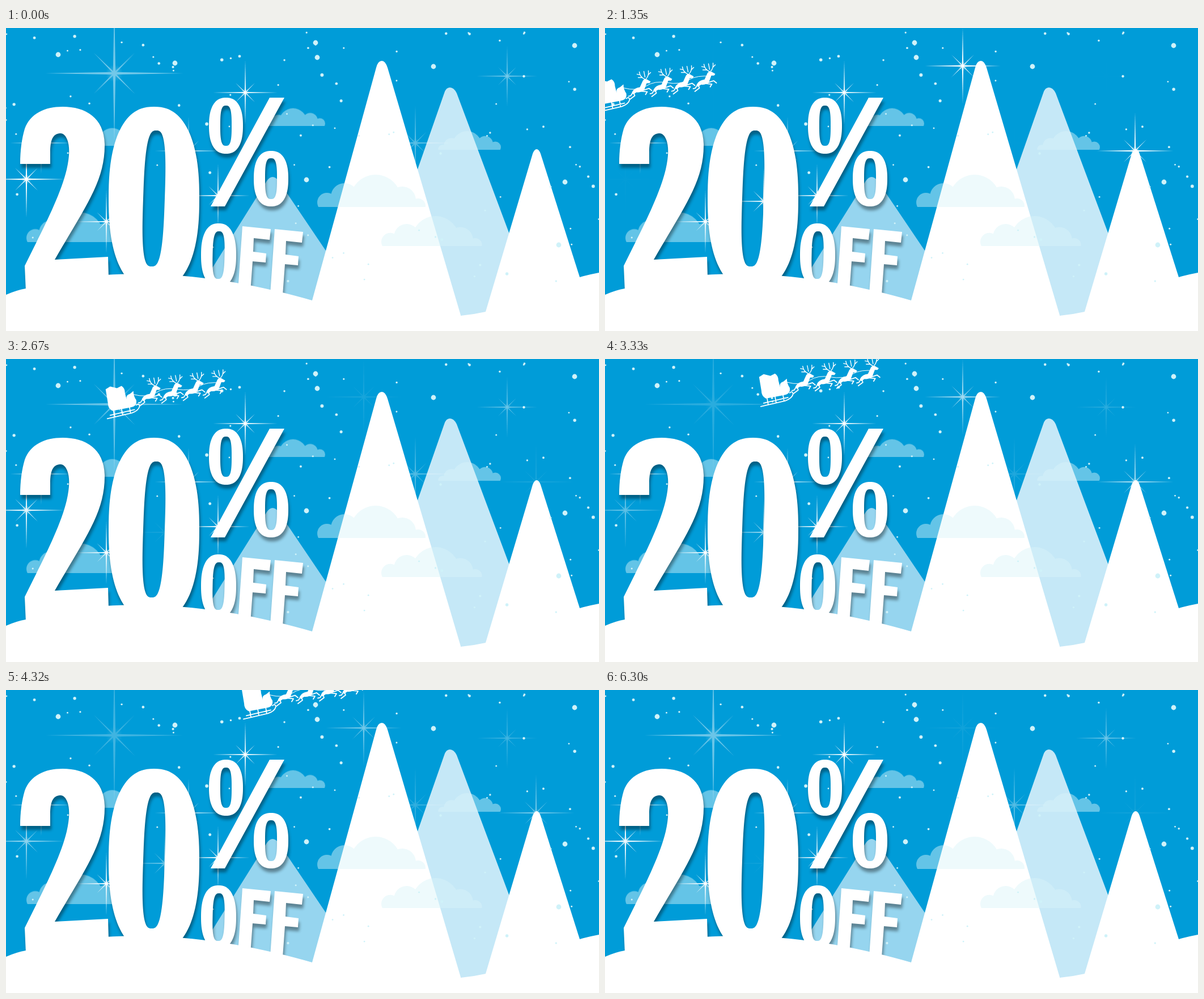
Write an HTML page that moves like this. It is 1046 by 535 pixels and loops after 6330 ms.

```html
<!DOCTYPE html>
<html lang="en">
<head>
<meta charset="utf-8">
<title>Winter sale</title>
<style>
  html, body { margin: 0; width: 100%; height: 100%; overflow: hidden; background: #009cd8; }
  svg { display: block; width: 100%; height: 100%; }
  #lettering { fill: #fff; fill-rule: evenodd; filter: drop-shadow(2px 7px 2.5px rgba(0, 0, 0, .38)); }
  .line { fill: none; stroke: #fff; stroke-linecap: round; stroke-linejoin: round; }
</style>
</head>
<body>
<svg viewBox="0 0 1046 535">
  <defs>
    <clipPath id="aboveBase"><rect x="-5" y="-70" width="210" height="70"/></clipPath>
    <path id="cloud" clip-path="url(#aboveBase)"/>
    <radialGradient id="glow">
      <stop offset="0" stop-color="#fff" stop-opacity=".6"/>
      <stop offset="1" stop-color="#fff" stop-opacity="0"/>
    </radialGradient>
    <g id="deer">
      <path fill="#fff" d="M148 91Q152 83 162 82L167 71Q170 66 174 68L181 72 179 75 174 75 170 86Q165 92 156 91L150 95Z"/>
      <path class="line" stroke-width="1.8" d="M166 88L178 84 183 88M164 89L175 90 172 95M151 91L153 97 145 103M149 92L146 97 142 98"/>
      <path class="line" stroke-width="1.4" d="M171 68Q162 64 161 55M162 60L157 59M166 65L159 65M173 67Q178 62 177 53M177 60L181 56M171 64L169 54"/>
    </g>
  </defs>

  <rect width="1046" height="535" fill="#009cd8"/>
  <path fill="#96d5ef" d="M340 462L460 270Q470 256 481 270L566 396 540 490Z"/>
  <path fill="#c5e8f7" d="M700 324L773 115Q776 105 783 105 790 105 795 115L890 369 846 510H800Z"/>
  <path fill="#fff" d="M540 481L653 70Q656 58 663 58 669 58 673 70L802 507 800 535H540Z"/>
  <path fill="#fff" d="M846 501L929 222Q932 214 936 214 940 214 943 222L1012 440V535H846Z"/>

  <g id="clouds" fill="#d9f4f9" opacity=".46"></g>
  <g id="snow" fill="#cff2f9"></g>
  <g id="stars" fill="#fff"></g>

  <g id="sleigh">
    <path fill="#fff" d="M84 74L92 69 104 72 112 68Q118 72 118 80L121 92Q119 84 127 82L133 77Q133 86 138 93 140 104 128 106L96 112Q88 108 88 98Z"/>
    <path class="line" stroke-width="1.8" d="M87 126L130 116Q142 112 144 104 143 98 138 102M92 120L135 110M98 111L100 122M112 108L114 119M126 105L128 116"/>
    <path class="line" stroke-width="1" d="M132 83Q158 90 173 80T210 74 248 69 287 63"/>
  </g>

  <g id="lettering" role="img" aria-label="20% OFF">
    <path d="M25 240C25 215 28 195 33 178 43 151 68 139 100 139 140 139 173 158 174 205 175 270 140 315 86 409L180 404 181 440V465H35L33 420C60 365 95 300 107 250 112 228 113 210 108 197 104 187 99 186 95 186 84 187 78 195 78 220V240Z"/>
    <path d="M465 123H491L386 315H361Z"/>
    <path id="letterF" d="M417 350L467 355 465 374 437 371 436 395 459 398 458 414 435 412 430 480H408Z"/>
    <use href="#letterF" x="57" y="5"/>
  </g>

  <path fill="#fff" d="M0 471Q18 463 35 460C150 425 330 420 540 481V508H802Q824 506 846 501H1012V440Q1030 435 1046 432V535H0Z"/>
</svg>
<script>
const LOOP = 6330, STEP = 30, TWINKLES = 7;
const byId = id => document.getElementById(id);

function add(parent, tag, attributes) {
  const node = document.createElementNS('http://www.w3.org/2000/svg', tag);
  for (const key in attributes) node.setAttribute(key, attributes[key]);
  return parent.appendChild(node);
}

// Condensed zeros: a superellipse around a narrow, slanted slot
function oval(cx, cy, rx, ry, power, slant = 0) {
  const bend = v => Math.sign(v) * Math.abs(v) ** (2 / power);
  const points = Array.from({ length: 120 }, (_, i) => {
    const angle = i / 60 * Math.PI;
    const y = bend(Math.sin(angle)) * ry;
    return `${(cx + bend(Math.cos(angle)) * rx - y * slant).toFixed(2)} ${(cy + y).toFixed(2)}`;
  });
  return `M${points.join('L')}Z`;
}

function addZero(cx, cy, rx, ry, holeRx, holeRy, slant) {
  add(byId('lettering'), 'path', {
    d: oval(cx, cy, rx, ry, 2.4) + oval(cx, cy, holeRx, holeRy, 3, slant)
  });
}
addZero(261, 301, 80, 162, 19, 120, .034);
addZero(388, 172.5, 30, 49.5, 10, 35.5);
addZero(467.5, 266, 30.5, 49, 10.5, 36);
addZero(375, 401, 31, 56, 10.5, 42, .02);

// Cloud bumps: x, y, radius above a flat base
const bumps = [[17, -8, 17], [48, -18, 24], [103, -12, 45], [150, -12, 24], [178, -2, 13]];
const circlePath = (x, y, r) => `M${x - r} ${y}a${r} ${r} 0 1 1 ${2 * r} 0a${r} ${r} 0 1 1 ${-2 * r} 0z`;
byId('cloud').setAttribute('d', bumps.map(bump => circlePath(...bump)).join('') + 'M10 0V-8H180V0Z');

// x, base, scale; a negative scale mirrors the cloud
for (const [x, y, scale] of [
  [549, 316, 1], [662, 385, .93], [36, 378, .92],
  [873, 215, -.58], [563, 173, -.55], [244, 208, -.55]
]) add(byId('clouds'), 'use', { href: '#cloud', transform: `translate(${x} ${y}) scale(${scale} ${Math.abs(scale)})` });

let seed = 11;
const random = () => (seed = seed * 16807 % 2147483647) / 2147483647;
const addFlake = (cx, cy, r) => add(byId('snow'), 'circle', { cx, cy, r });

// A few large flakes have fixed places, the small ones are scattered
for (const [x, y] of [[92, 47], [298, 62], [546, 26], [549, 52], [754, 68], [1003, 31], [986, 272], [530, 268], [975, 383]])
  addFlake(x, y, 4.4);
for (let i = 0; i < 110; i++)
  addFlake(random() * 1046, 8 + 440 * random() ** 1.3, 1.4 + 1.8 * random() ** 3);

const ray = (length, width) => `M${-length} 0L0 ${-width} ${length} 0 0 ${width}Z`;

function addStar(group, x, y, length, opacity = 1) {
  const star = add(group, 'g', { transform: `translate(${x} ${y})`, opacity });
  const diagonal = length * .42, width = length * .018;
  add(star, 'circle', { r: length * .13, fill: 'url(#glow)' });
  for (const angle of [0, 90]) {
    add(star, 'path', { d: ray(length, width), transform: `rotate(${angle})` });
    add(star, 'path', { d: ray(diagonal, width * .7), transform: `rotate(${angle + 45})` });
  }
}

const [steadyStars, firstStars, secondStars] = [0, 1, 2].map(() => add(byId('stars'), 'g', {}));
addStar(steadyStars, 422, 114, 57);
addStar(steadyStars, 374, 296, 56);
addStar(steadyStars, 177, 342, 56);
addStar(steadyStars, 62, 203, 55, .8);
addStar(steadyStars, 322, 217, 60, .8);
addStar(firstStars, 191, 80, 122, .45);
addStar(firstStars, 36, 267, 68);
addStar(firstStars, 884, 85, 54, .45);
addStar(firstStars, 722, 203, 66, .35);
addStar(secondStars, 631, 67, 67);
addStar(secondStars, 935, 217, 68);
addStar(secondStars, 280, 306, 62);

const sleigh = byId('sleigh');
for (let i = 0; i < 4; i++) add(sleigh, 'use', { href: '#deer', x: i * 38, y: i * -4.5 });

function draw(now) {
  const time = Math.floor(now % LOOP / STEP) * STEP;
  const phase = time / LOOP * TWINKLES % 1;
  const fade = 1 - Math.abs(1 - 2 * phase);
  firstStars.setAttribute('opacity', 1 - fade);
  secondStars.setAttribute('opacity', fade);
  const travelled = time - 2040;
  sleigh.setAttribute('transform', `translate(${travelled * .1456} ${travelled * -.0327})`);
  requestAnimationFrame(draw);
}
draw(performance.now());
</script>
</body>
</html>
```
